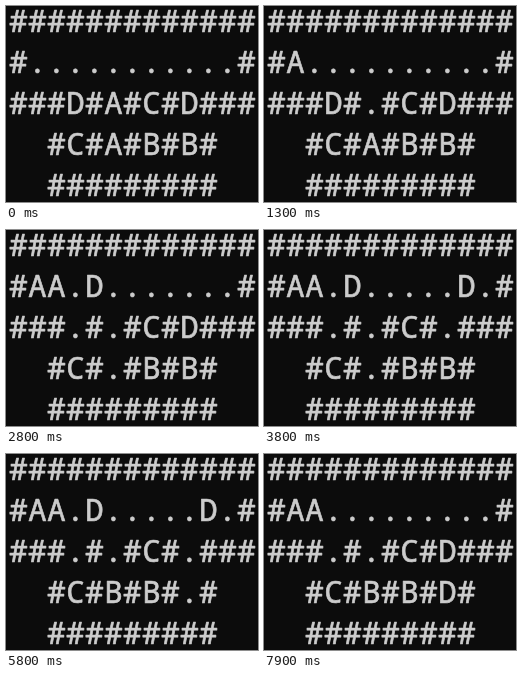
Animation of 252x196 px, one loop 8000 ms. Source, as an HTML page with a canvas:

```html
<!DOCTYPE html>
<html lang="en">
<head>
<meta charset="utf-8">
<title>Sorting letters into rooms</title>
<style>
  html, body { margin: 0; height: 100%; overflow: hidden; background: #0c0c0c; }
  canvas { display: block; }
</style>
</head>
<body>
<canvas width="252" height="196"></canvas>
<script>
const LOOP = 8000;
const COL = { start: 12.5, step: 19 };
const BASELINE = { start: 26, step: 41 };

const START = [
  '#############',
  '#...........#',
  '###D#A#C#D###',
  '  #C#A#B#B#',
  '  #########',
];

// Each letter jumps from one [row, column] to another.
const MOVES = [
  { at: 600, from: [2, 5], to: [1, 1] },
  { at: 1700, from: [3, 5], to: [1, 2] },
  { at: 2700, from: [2, 3], to: [1, 4] },
  { at: 3800, from: [2, 9], to: [1, 10] },
  { at: 4800, from: [3, 9], to: [1, 8] },
  { at: 5700, from: [1, 8], to: [3, 5] },
  { at: 6800, from: [1, 10], to: [3, 9] },
  { at: 7700, from: [1, 4], to: [2, 9] },
];

const ctx = document.querySelector('canvas').getContext('2d');
ctx.font = '30.5px "Noto Sans Mono", "DejaVu Sans Mono", monospace';
ctx.textAlign = 'center';
ctx.lineWidth = 0.7;
ctx.lineJoin = 'round';
ctx.strokeStyle = '#cccccc';

function boardAt(time) {
  const board = START.map(row => [...row]);
  for (const { at, from: [r1, c1], to: [r2, c2] } of MOVES) {
    if (time < at) break;
    board[r2][c2] = board[r1][c1];
    board[r1][c1] = '.';
  }
  return board;
}

// A thin outline gives the glyphs their medium weight.
function drawChar(char, x, y) {
  ctx.fillText(char, x, y);
  ctx.strokeText(char, x, y);
}

function draw(time) {
  ctx.fillStyle = '#0c0c0c';
  ctx.fillRect(0, 0, 252, 196);
  ctx.fillStyle = '#cccccc';
  boardAt(time).forEach((row, r) => row.forEach((char, c) =>
    drawChar(char, COL.start + c * COL.step, BASELINE.start + r * BASELINE.step)));
}

const began = performance.now();
function tick() {
  draw((performance.now() - began) % LOOP);
  requestAnimationFrame(tick);
}
tick();
</script>
</body>
</html>
```
